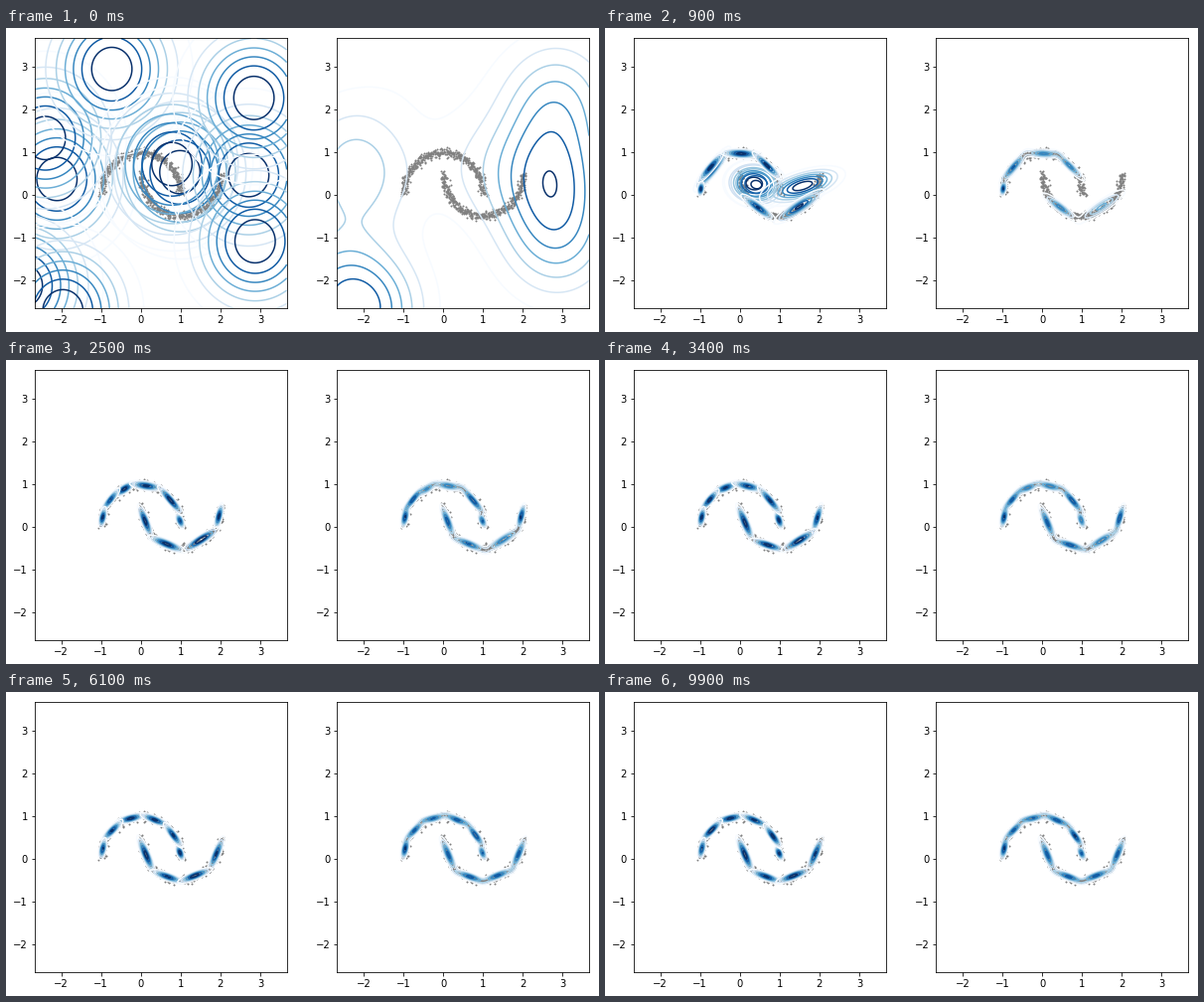
A matplotlib script for the animation above (10000 ms loop, 597x306 px).

```python
import numpy as np
import matplotlib.pyplot as plt
from matplotlib.animation import FuncAnimation
from matplotlib.ticker import MaxNLocator

W, H, DPI = 597, 306, 72
FRAMES, INTERVAL = 100, 100
LO, HI = -2.665, 3.665
NOISE = 0.05

# Two interleaved noisy half circles
t = np.linspace(0, np.pi, 500)
X = np.vstack([np.column_stack([np.cos(t), np.sin(t)]),
               np.column_stack([1 - np.cos(t), 0.5 - np.sin(t)])])
X += np.random.RandomState(0).normal(scale=NOISE, size=X.shape)

axis = np.linspace(LO, HI, 200)
GX, GY = np.meshgrid(axis, axis)
GRID = np.column_stack([GX.ravel(), GY.ravel()])


def pdf(pts, mu, cov):
    """Density of every component at every point, shape (k, n)."""
    dx = pts[None, :, 0] - mu[:, 0, None]
    dy = pts[None, :, 1] - mu[:, 1, None]
    a, b, c = (cov[:, i, j, None] for i, j in ((0, 0), (0, 1), (1, 1)))
    det = a * c - b * b
    q = (c * dx**2 - 2 * b * dx * dy + a * dy**2) / det
    return np.exp(-q / 2) / (2 * np.pi * np.sqrt(det))


def em_step(mu, cov, w):
    """One round of expectation maximisation on the data."""
    r = w[:, None] * pdf(X, mu, cov)
    r /= r.sum(axis=0)
    n = r.sum(axis=1)
    mu = r @ X / n[:, None]
    d = X[None] - mu[:, None]
    cov = np.einsum('kn,kni,knj->kij', r, d, d) / n[:, None, None]
    return mu, cov + 1e-6 * np.eye(2), n / len(X)


# Starting mean x, mean y and weight of each unit Gaussian
start = np.array([
    (-2.11, 0.37, 0.107), (-2.40, 1.33, 0.041), (-0.73, 2.95, 0.020),
    (0.98, 0.53, 0.030), (0.78, 0.72, 0.027), (-2.98, -2.13, 0.087),
    (-1.96, -2.73, 0.210), (2.71, 0.46, 0.182), (2.87, -1.09, 0.145),
    (2.84, 2.27, 0.142)])

states = [(start[:, :2], np.tile(np.eye(2), (len(start), 1, 1)),
           start[:, 2] / start[:, 2].sum())]
while len(states) < FRAMES:
    states.append(em_step(*states[-1]))

fig = plt.figure(figsize=(W / DPI, H / DPI), dpi=DPI, facecolor='white')
axes = [fig.add_axes([x / W, 23.7 / H, 253.64 / W, 271.8 / H])
        for x in (29.0, 333.36)]
for ax in axes:
    ax.scatter(X[:, 0], X[:, 1], s=1, c='gray')
    ax.set(xlim=(LO, HI), ylim=(LO, HI))

locator = MaxNLocator(8, min_n_ticks=1)
drawn = []


def contour(ax, z):
    lev = locator.tick_values(z.min(), z.max())
    lev = lev[(lev > z.min()) & (lev < z.max())]
    drawn.append(ax.contour(GX, GY, z.reshape(GX.shape), levels=lev,
                            cmap='Blues', linewidths=1.5))


def update(i):
    while drawn:
        drawn.pop().remove()
    mu, cov, w = states[i]
    parts = pdf(GRID, mu, cov)
    for z in parts:
        contour(axes[0], z)
    contour(axes[1], w @ parts)
    return drawn


anim = FuncAnimation(fig, update, frames=FRAMES, interval=INTERVAL,
                     init_func=lambda: [], repeat=True, repeat_delay=0)
plt.show()
```
